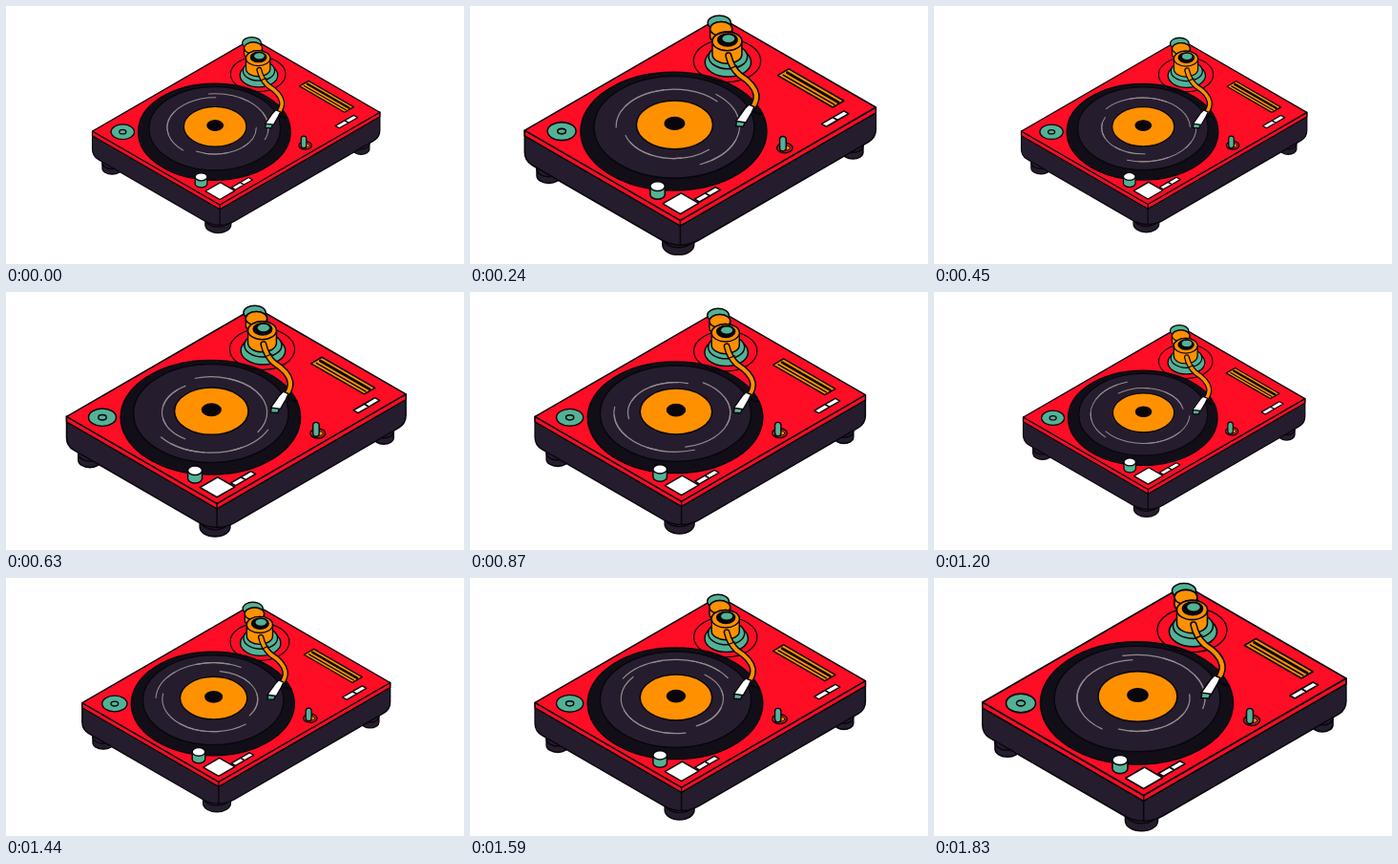
Write an HTML page with a canvas that moves like this. It is 480x270 px and loops after 1860 ms.

```html
<!DOCTYPE html>
<html lang="en">
<head>
<meta charset="utf-8">
<title>Turntable</title>
<style>
html, body { margin: 0; width: 100%; height: 100%; overflow: hidden; background: #fff; }
canvas { display: block; width: 480px; height: 270px; }
</style>
</head>
<body>
<canvas id="stage" width="480" height="270"></canvas>
<script>
const ctx = document.getElementById('stage').getContext('2d');
const LOOP = 1860, STEP = 30, BEAT = 360, TAU = Math.PI * 2;
const RED = '#fe0d25', ORANGE = '#ff9100', TEAL = '#53b295', DARK = '#251d2e',
      BLACK = '#08060b', PLATTER = '#120e18', WHITE = '#fff', GROOVE = '#938b8b';
const W = 195, D = 245, LIP = 6, DEPTH = 33, FLAT = 0.635;

// Deck coordinates: u runs right and down, v left and down, z straight down
const at = (u, v, z = 0) => [263 + (u - v) * 0.866, 7.5 + (u + v) / 2 + z];

function paint(fill, line = 1.6, color = BLACK) {
  if (fill) { ctx.fillStyle = fill; ctx.fill(); }
  if (line) { ctx.lineWidth = line; ctx.strokeStyle = color; ctx.stroke(); }
}

function poly(points, fill) {
  ctx.beginPath();
  points.forEach(p => ctx.lineTo(...p));
  ctx.closePath();
  paint(fill);
}

function tile(u, v, w, d, fill) {
  poly([at(u, v), at(u + w, v), at(u + w, v + d), at(u, v + d)], fill);
}

function line(a, b, width, color = BLACK) {
  ctx.beginPath();
  ctx.moveTo(...a);
  ctx.lineTo(...b);
  paint(null, width, color);
}

function disc(x, y, r, fill, width) {
  ctx.beginPath();
  ctx.ellipse(x, y, r, r * FLAT, 0, 0, TAU);
  paint(fill, width);
}

// Upright cylinder: side wall, then its lid
function drum(x, y, r, h, side, lid = side) {
  ctx.beginPath();
  ctx.ellipse(x, y, r, r * FLAT, 0, Math.PI, TAU);
  ctx.ellipse(x, y + h, r, r * FLAT, 0, 0, Math.PI);
  ctx.closePath();
  paint(side);
  disc(x, y, r, lid);
}

function body() {
  drum(77, 172, 13, 7, DARK);
  drum(217.5, 246, 17, 8, DARK);
  drum(407, 147, 11, 7, DARK);

  const front = z => at(W, D, z), left = z => at(0, D, z), right = z => at(W, 0, z);
  ctx.beginPath();
  ctx.moveTo(...left(0));
  ctx.arcTo(...left(DEPTH), ...front(DEPTH), 16);
  ctx.arcTo(...front(DEPTH), ...right(DEPTH), 40);
  ctx.arcTo(...right(DEPTH), ...right(0), 16);
  ctx.lineTo(...right(0));
  ctx.closePath();
  paint(DARK);

  line(front(LIP), front(DEPTH - 7), 1.5);
  poly([left(0), left(LIP), front(LIP), right(LIP), right(0), front(0)], RED);
  tile(0, 0, W, D, RED);
  line(front(0), front(LIP), 1.6);
}

function record(angle) {
  disc(212.5, 131, 101, PLATTER);
  disc(213, 126.5, 87, DARK);
  for (let i = 0; i < 9; i++) {
    const r = 55 + i % 3 * 8;
    const from = i * 2.3 + angle;
    ctx.beginPath();
    ctx.ellipse(213, 125.5, r, r * FLAT, 0, from, from + 0.8 + i % 2 * 0.4);
    paint(null, 1.3, GROOVE);
  }
  disc(213.5, 124, 41.5, ORANGE);
  disc(213.5, 122.5, 10.5, BLACK);
}

function controls() {
  disc(91, 131, 15.5, TEAL);
  disc(91, 131, 4.5, TEAL);

  tile(99, 13, 69, 14, ORANGE);
  line(at(102, 18), at(166, 18), 3);
  line(at(102, 23), at(166, 23), 1.6);

  for (const k of [0, 1]) {
    tile(179, 24 + k * 14, 6, 14, WHITE);
    tile(181, 187 + k * 13, 6, 13, WHITE);
  }
  tile(166, 215, 22, 23, WHITE);
  drum(195, 190.5, 8, 9, TEAL, WHITE);

  disc(333, 149, 8.5, RED);
  disc(335, 149, 4, ORANGE, 1);
  line([331, 140], [331, 149], 8.5);
  line([331, 140], [331, 149], 5.4, TEAL);
}

function arm() {
  disc(270.5, 54.5, 36.5, null, 1.3);
  disc(271.5, 56, 25, TEAL);
  disc(271.5, 50, 21, TEAL);

  disc(262, 13.5, 12.5, TEAL);
  drum(264, 20, 12, 8, ORANGE);
  drum(270.5, 33.5, 16, 14, ORANGE);
  disc(271, 32, 10.5, BLACK);
  disc(272, 30.5, 7.5, TEAL);

  const tube = new Path2D('M272 49Q275 62 284 70Q300 80 302 91Q303 98 298 105');
  [[7.6, BLACK], [4.4, ORANGE]].forEach(([width, color]) => {
    ctx.lineWidth = width;
    ctx.strokeStyle = color;
    ctx.stroke(tube);
  });
  line([274, 63], [281, 60], 1.4);

  line([296, 109], [309, 113], 2.5);
  poly([[281, 119], [290, 121], [288, 126], [280, 125.5]], TEAL);
  poly([[290, 106], [294, 102], [300, 104.5], [297, 111], [291, 121.5], [280, 120]], WHITE);
}

// Fast swell into each beat, then an easing shrink; the last beat holds
function width(t) {
  if (t >= 1620) return 382;
  if (t < 120) return 302 - t / 20;
  const p = (t - 120) % BEAT;
  if (p < 60) return 296 + 86 * (p / 60) ** 0.75;
  const rest = Math.min(1, (330 + 30 - p) / 270);
  return 296 + 86 * rest ** 1.4;
}

function draw(now) {
  const t = Math.floor(now % LOOP / STEP) * STEP;
  const s = width(t) / 382;
  ctx.setTransform(1, 0, 0, 1, 0, 0);
  ctx.fillStyle = WHITE;
  ctx.fillRect(0, 0, 480, 270);
  ctx.translate(240.5, 134.5);
  ctx.scale(s, s);
  ctx.translate(-240.5, -134.5);
  ctx.lineJoin = ctx.lineCap = 'round';
  body();
  record(TAU * t / LOOP);
  controls();
  arm();
}

const start = performance.now();
function tick() {
  draw(performance.now() - start);
  requestAnimationFrame(tick);
}
tick();
</script>
</body>
</html>
```
